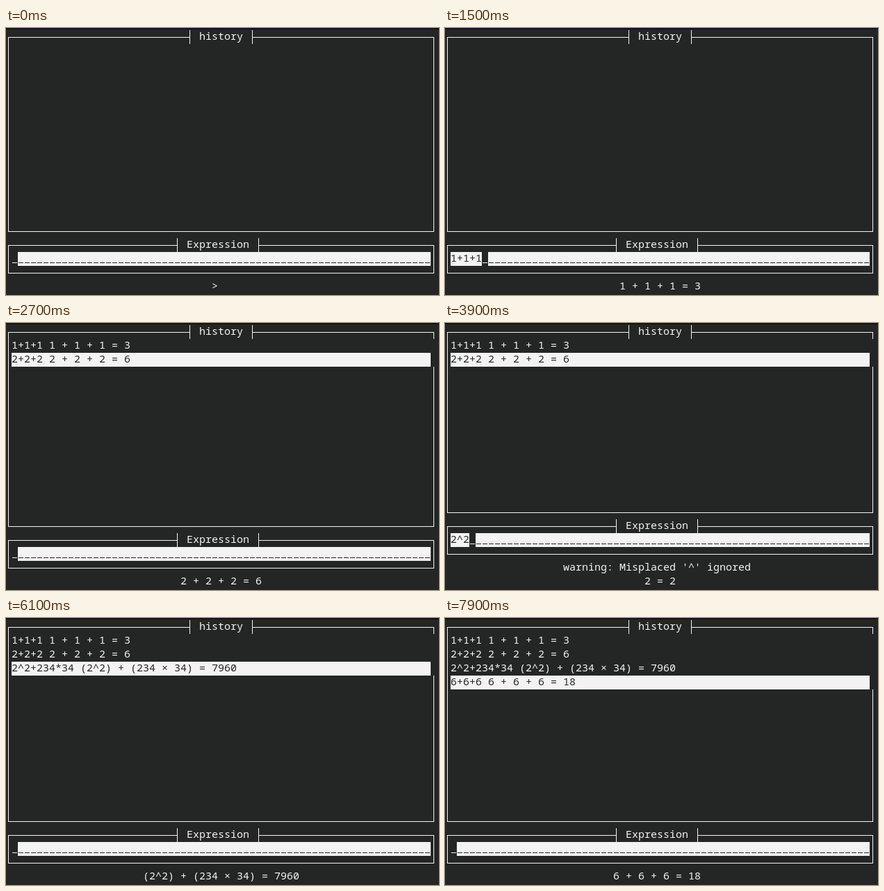
An HTML page with a canvas that plays this animation: 623x385 px, repeating every 8000 ms.

```html
<!DOCTYPE html>
<html lang="en">
<head>
<meta charset="utf-8">
<title>Terminal calculator</title>
<style>
  html, body { margin: 0; width: 100%; height: 100%; overflow: hidden; background: #242625; }
  canvas { display: block; }
</style>
</head>
<body>
<canvas id="screen" width="623" height="385"></canvas>
<script>
const ctx = document.getElementById('screen').getContext('2d');
const LOOP = 8000, COLS = 67, CW = 9, RH = 20;
const DARK = '#242625', LIGHT = '#f3f3f3';

const warning = op => `warning: Misplaced '${op}' ignored`;

// [start ms, input, footer, operator warned about on an extra line]
// An empty input after the first step means Enter was pressed.
const steps = [
  [0, '', '> '],
  [800, '1', '1 = 1'],
  [1000, '1+', warning('+')],
  [1100, '1+', '1 = 1', '+'],
  [1200, '1+1', '1 + 1 = 2'],
  [1500, '1+1+1', '1 + 1 + 1 = 3'],
  [1700, '', '1 + 1 + 1 = 3'],
  [2100, '2', '2 = 2'],
  [2200, '2+', '2 = 2'],
  [2300, '2+', '2 = 2', '+'],
  [2400, '2+2', '2 = 2', '+'],
  [2500, '2+2', '2 + 2 = 4'],
  [2600, '2+2+2', '2 + 2 + 2 = 6'],
  [2700, '', '2 + 2 + 2 = 6'],
  [3200, '2', '2 = 2'],
  [3600, '2^', '2 = 2'],
  [3700, '2^', '2 = 2', '^'],
  [3900, '2^2', '2 = 2', '^'],
  [4000, '2^2', '2^2 = 4'],
  [4500, '2^2+', '2^2 = 4'],
  [4600, '2^2+', '2^2 = 4', '+'],
  [4800, '2^2+2', '2^2 = 4', '+'],
  [4900, '2^2+23', '(2^2) + 23 = 27'],
  [5000, '2^2+234', '(2^2) + 234 = 238'],
  [5500, '2^2+234*', warning('*')],
  [5600, '2^2+234*', '(2^2) + 234 = 238', '*'],
  [5800, '2^2+234*3', '(2^2) + 234 = 238', '*'],
  [5900, '2^2+234*34', '(2^2) + (234 × 34) = 7960'],
  [6100, '', '(2^2) + (234 × 34) = 7960'],
  [7400, '6', '6 = 6'],
  [7500, '6+', '6 = 6', '+'],
  [7600, '6+6', '6 + 6 = 12'],
  [7700, '6+6+6', '6 + 6 + 6 = 18'],
  [7900, '', '6 + 6 + 6 = 18']
];

const colX = col => 8 + col * CW;
const rowY = row => 3 + row * RH;

function rect(x, y, w, h, color = LIGHT) {
  ctx.fillStyle = color;
  ctx.fillRect(x, y, w, h);
}

function text(str, col, row, color = LIGHT) {
  ctx.fillStyle = color;
  [...str].forEach((ch, i) => ctx.fillText(ch, colX(col + i), rowY(row) + 14));
}

function centered(str, row) {
  text(str, Math.floor((COLS - str.length) / 2), row);
}

function fillCells(col, count, row) {
  rect(colX(col), rowY(row), count * CW, RH);
}

function frame(title, top, bottom) {
  const y1 = rowY(top) + 10, y2 = rowY(bottom) + 10;
  const col = Math.floor((COLS - title.length) / 2);
  const left = colX(col - 2) + 4, right = colX(col + title.length + 1) + 4;
  rect(3, y1, left - 3, 1);
  rect(right, y1, 616 - right, 1);
  rect(left, y1 - 10, 1, RH);
  rect(right, y1 - 10, 1, RH);
  rect(3, y2, 613, 1);
  rect(3, y1, 1, y2 - y1);
  rect(615, y1, 1, y2 - y1);
  text(title, col, top);
}

function drawHistory(lines) {
  lines.forEach((line, i) => {
    const row = i + 1, selected = row === lines.length;
    rect(615, rowY(row), 1, RH, DARK);
    if (selected) fillCells(0, COLS, row);
    text(line, 0, row, selected ? DARK : LIGHT);
  });
}

function drawInput(input, row) {
  const cursor = input.length;
  fillCells(0, cursor, row);
  fillCells(cursor + 1, COLS - cursor - 1, row);
  text(input, 0, row, DARK);
  for (let col = cursor; col < COLS; col++) {
    rect(colX(col) + 1, rowY(row) + 15, 7, 1, col === cursor ? LIGHT : DARK);
  }
}

function draw(time) {
  const done = steps.filter(step => step[0] <= time);
  const [, input, footer, op] = done[done.length - 1];
  const history = [];
  done.forEach((step, i) => {
    if (i && !step[1]) history.push(done[i - 1][1] + ' ' + step[2]);
  });
  const shift = op ? 1 : 0;

  rect(0, 0, 623, 385, DARK);
  rect(0, 0, 623, 2, '#11141b');
  ctx.font = '15px "Noto Sans Mono", "DejaVu Sans Mono", monospace';
  frame('history', 0, 14 - shift);
  drawHistory(history);
  frame('Expression', 15 - shift, 17 - shift);
  drawInput(input, 16 - shift);
  if (op) centered(warning(op), 17);
  centered(footer, 18);
}

const start = performance.now();
function tick() {
  draw((performance.now() - start) % LOOP);
  requestAnimationFrame(tick);
}
tick();
</script>
</body>
</html>
```
